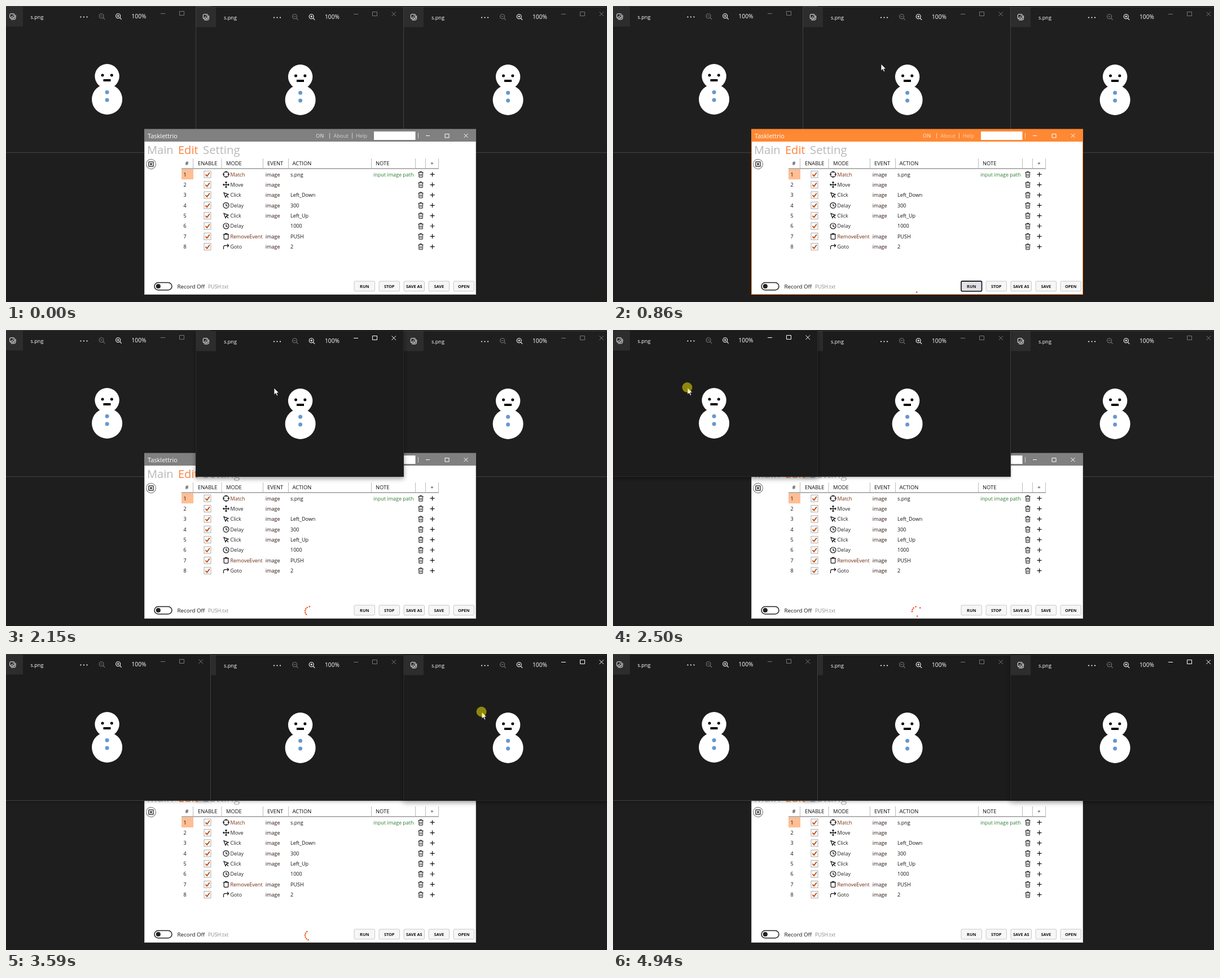
An HTML page for the animation above (5870 ms loop, 1065 by 526 pixels).

```html
<!DOCTYPE html>
<html lang="en">
<head>
<meta charset="utf-8">
<title>Macro editor</title>
<style>
html, body { margin: 0; width: 100%; height: 100%; overflow: hidden; background: #1e1e1e; }
svg { display: block; font-family: "Open Sans", "Noto Sans", sans-serif; }
text { white-space: pre; }
.line { fill: none; stroke: #111; stroke-width: 1.2; }
</style>
</head>
<body>
<svg id="stage" width="1065" height="526" viewBox="0 0 1065 526">
  <defs>
    <filter id="deep" x="-10%" y="-10%" width="120%" height="125%">
      <feDropShadow dx="0" dy="3" stdDeviation="4" flood-color="#000" flood-opacity=".4"/>
    </filter>
    <filter id="soft" x="-10%" y="-10%" width="120%" height="125%">
      <feDropShadow dx="0" dy="2" stdDeviation="2.5" flood-color="#000" flood-opacity=".22"/>
    </filter>
  </defs>
  <rect width="1065" height="526" fill="#1e1e1e"/>
  <rect width="1065" height="1" fill="#141414"/>
  <g id="desk"></g>
  <g id="pointer">
    <path id="arrow" d="M0 0V12.2L2.9 9.5L4.9 13.9L6.9 13L5 8.8H8.8Z" fill="#fff" stroke="#111" stroke-width=".8"/>
    <circle id="press" cx="-.5" cy="-.5" r="9" fill="#fff000" fill-opacity=".5"/>
  </g>
</svg>
<script>
const LOOP = 5870;
const $ = id => document.getElementById(id);
const desk = $('desk');

// Markup helpers
const text = (x, y, s, size, fill = '#111', extra = '') =>
  `<text x="${x}" y="${y}" font-size="${size}" fill="${fill}" ${extra}>${s}</text>`;
const rect = (x, y, w, h, fill, extra = '') =>
  `<rect x="${x}" y="${y}" width="${w}" height="${h}" fill="${fill}" ${extra}/>`;
const disc = (x, y, r, fill, extra = '') =>
  `<circle cx="${x}" cy="${y}" r="${r}" fill="${fill}" ${extra}/>`;
const path = (d, extra = 'class="line"') => `<path d="${d}" ${extra}/>`;
const at = (x, y, inner) => `<g transform="translate(${x} ${y})">${inner}</g>`;

function group(markup) {
  const g = document.createElementNS('http://www.w3.org/2000/svg', 'g');
  g.innerHTML = markup;
  desk.append(g);
  return g;
}

// Image viewer window
const snowman =
  disc(521.6, 125.8, 21.7, '#fff') + disc(521.6, 166.9, 27, '#fff') +
  disc(513.5, 124, 2.5, '#000') + disc(529.8, 124, 2.5, '#000') +
  rect(515, 131, 13, 4, '#000') +
  disc(521.6, 154.3, 3.5, '#6699cc') + disc(521.6, 168, 3.5, '#6699cc');

function lens(x, color, sign) {
  const look = `fill="none" stroke="${color}" stroke-width="1.1"`;
  return disc(x, 18.7, 4, 'none', `stroke="${color}" stroke-width="1.1"`) +
    path(`M${x + 3} 21.7L${x + 6} 24.8${sign}`, look);
}

function viewer(dx, dy) {
  const icon = `fill="none" stroke="#fff" stroke-width="1"`;
  const edge = Math.ceil(dx);
  const g = group(
    at(edge, dy,
      rect(336.5, 1.5, 368, 259 - dy, '#1f1f1f', 'class="frame"') +
      rect(337, 2, 35, 35.5, '#2d2d2d') +
      path('M616 14.5H624M649.5 10.5H657.5V17.5H649.5ZM683.5 10.5L691 18M691 10.5L683.5 18', 'class="ctl" fill="none" stroke-width="1"')) +
    at(dx, dy,
      rect(349.3, 14.8, 8.2, 8, 'none', 'rx="1.5" stroke="#fff"') +
      path('M350.3 22.4L353.4 19L356.6 22.4M351.3 24.9H357Q359.5 24.9 359.5 22.4V17', icon) +
      disc(355.2, 17.2, .8, '#fff') +
      text(386, 23.5, 's.png', 9.1, '#fff') +
      [475, 480.5, 486].map(x => disc(x, 20.5, 1.1, '#fff')).join('') +
      lens(511.6, '#777', 'M509.6 18.7H513.6') +
      lens(541.2, '#fff', 'M539.2 18.7H543.2M541.2 16.7V20.7') +
      text(565, 23.2, '100%', 10.2, '#fff') +
      snowman));
  const frame = g.querySelector('.frame'), ctl = g.querySelector('.ctl');
  g.look = (active, raised) => {
    frame.setAttribute('stroke', active ? '#292929' : '#414141');
    ctl.setAttribute('stroke', active ? '#fff' : '#777');
    frame.setAttribute('filter', active ? 'url(#deep)' : raised ? 'url(#soft)' : 'none');
  };
  return g;
}

// Script editor window
const modeIcons = {
  Match: path('M-4.8 0A4.8 4.8 0 1 1 4.8 0A4.8 4.8 0 1 1 -4.8 0M0 -6V-2.5M0 6V2.5M-6 0H-2.5M6 0H2.5'),
  Move: path('M0 -5V5M-5 0H5M-1.7 -3.5L0 -5.2L1.7 -3.5M-1.7 3.5L0 5.2L1.7 3.5M-3.5 -1.7L-5.2 0L-3.5 1.7M3.5 -1.7L5.2 0L3.5 1.7'),
  Click: path('M-4 -4L4 -1L.6 .6L-1 4ZM.6 .6L4 4.5'),
  Delay: path('M-5 0A5 5 0 1 1 5 0A5 5 0 1 1 -5 0M0 -3V.4L2.6 1.4'),
  RemoveEvent: path('M-5 -3.5H5M-1.8 -3.5V-5H1.8V-3.5M-3.8 -3.5V4Q-3.8 5 -2.8 5H2.8Q3.8 5 3.8 4V-3.5'),
  Goto: path('M-4.5 4.5V1Q-4.5 -2 -1.5 -2H4.5M2 -4.7L4.7 -2L2 .7')
};
const modeColors = { Match: '#7a3414', RemoveEvent: '#6e2a10' };
const bin = path('M-4.5 -3.5H4.5M-1.6 -3.5V-5H1.6V-3.5M-3.5 -3.5L-3.1 5H3.1L3.5 -3.5M-1.2 -1V3M1.2 -1V3', 'class="line" style="stroke-width:1"');

const rows = [
  ['Match', 'image', 's.png'], ['Move', 'image', ''], ['Click', 'image', 'Left_Down'],
  ['Delay', 'image', '300'], ['Click', 'image', 'Left_Up'], ['Delay', '', '1000'],
  ['RemoveEvent', 'image', 'PUSH'], ['Goto', 'image', '2']
];

function scriptRow([mode, event, action], i) {
  return at(0, 299.2 + 18.36 * i,
    (i ? '' : rect(311, -9.2, 21, 18.2, '#ffbe93')) +
    text(317, 3.3, i + 1, 9, '#111', 'text-anchor="middle"') +
    rect(351, -6, 12, 12, '#fff', 'stroke="#aaa"') +
    path('M353.5 .2L356.2 3L360.8 -3.2', 'fill="none" stroke="#c04f12" stroke-width="1.9"') +
    at(390, 0, modeIcons[mode]) +
    text(397.5, 3.3, mode, 9, modeColors[mode] || '#222') +
    text(459.8, 3.3, event, 9, '#2a1410') +
    text(504, 3.3, action, 9) +
    at(735, 0, bin) + path('M751.5 0H759.5M755.5 -4V4'));
}

const headings = [[317.5, '#'], [340, 'ENABLE'], [390, 'MODE'], [463, 'EVENT'], [507.5, 'ACTION'], [655, 'NOTE'], [752.3, '+']];
const buttons = ['RUN', 'STOP', 'SAVE AS', 'SAVE', 'OPEN'];

function editor() {
  const g = group(
    rect(245.5, 219.5, 587, 293, '#fff', 'class="border"') +
    rect(245, 218.5, 588, 22.5, '#808080', 'class="bar"') +
    text(251, 234.6, 'Tasklettrio', 11, '#fff') +
    `<g class="menu">` + text(549, 234, 'ON', 9.3, 'inherit', 'font-weight="600"') +
    text(580.5, 234, 'About', 9.3, 'inherit') + text(620, 234, 'Help', 9.3, 'inherit') +
    [573, 613, 730].map(x => rect(x, 225.5, 1, 10, 'inherit')).join('') + `</g>` +
    rect(652, 223, 73.5, 15, '#fff') +
    path('M744 230.5H751M778 227.5H785V234H778ZM811.5 227L818.5 234M818.5 227L811.5 234', 'fill="none" stroke="#fff"') +
    text(250, 263, 'Main', 20, '#b8b8b8') +
    text(305, 263, 'Edit', 20, '#fb8440') +
    text(349, 263, 'Setting', 20.3, '#b8b8b8') +
    disc(257, 281, 8.6, '#f7f7f7', 'stroke="#888" stroke-width="1.2"') +
    rect(252.8, 276.8, 8.4, 8.4, 'none', 'rx="1" stroke="#222" stroke-width="1.2"') +
    path('M255.2 279.2L258.8 282.8M258.8 279.2L255.2 282.8') +
    headings.map(([x, s]) => text(x, 283.3, s, 9.4)).join('') +
    [331, 381.5, 455, 500, 647, 725, 743, 766].map(x => rect(x, 271, 1, 18, '#bbb')).join('') +
    rect(311, 288, 456, 1.8, '#aaa') +
    rows.map(scriptRow).join('') +
    text(651, 302.5, 'input image path', 9, '#2e7d32') +
    rect(263, 491.5, 31, 13.2, '#fff', 'rx="6.6" stroke="#222" stroke-width="1.5"') +
    disc(269.8, 498, 4.1, '#222') +
    text(303.5, 502, 'Record Off', 9.8) + text(358, 502, 'PUSH.txt', 8.8, '#888') +
    buttons.map((s, i) => rect(617 + 44 * i, 489, 36.5, 17.8, '#f6f6f6', `class="btn" rx="2" stroke="#c8c8c8"`) +
      text(635.2 + 44 * i, 501.4, s, 7.3, '#111', 'font-weight="700" text-anchor="middle"')).join('') +
    disc(0, 0, 1.3, '#e4511b', 'class="dot"').repeat(6));
  const bar = g.querySelector('.bar'), border = g.querySelector('.border');
  const menu = g.querySelector('.menu'), run = g.querySelector('.btn');
  g.look = active => {
    bar.setAttribute('fill', active ? '#ff8833' : '#808080');
    border.setAttribute('stroke', active ? '#ff8833' : '#c8c8c8');
    menu.setAttribute('fill', active ? '#ffd3b0' : '#d0d0d0');
    run.setAttribute('fill', active ? '#e0e0e6' : '#f6f6f6');
    run.setAttribute('stroke', active ? '#222' : '#c8c8c8');
    run.setAttribute('stroke-width', active ? 1.8 : 1);
  };
  g.dots = [...g.querySelectorAll('.dot')];
  return g;
}

const left = viewer(-342.5, -1), mid = viewer(0, 0), right = viewer(368, 0), edit = editor();

// Stacking from back to front, and the active window
const stages = [
  { from: 0, stack: [left, mid, right, edit], active: null },
  { from: 565, stack: [left, mid, right, edit], active: edit },
  { from: 930, stack: [left, right, edit, mid], active: mid },
  { from: 2255, stack: [right, edit, mid, left], active: left },
  { from: 3580, stack: [edit, mid, left, right], active: right }
];
let shown = null;

function stackWindows(t) {
  const stage = stages.findLast(s => t >= s.from);
  if (stage === shown) return;
  shown = stage;
  const { stack, active } = stage;
  stack.forEach((w, i) => {
    desk.append(w);
    w.look(w === active, i > stack.indexOf(edit));
  });
}

// Progress ring: [ms, degrees, spline of the segment that ends here]
const ringKeys = [
  [0, -110], [433, 10, [.02, .33, .38, .77]], [1200, 93], [1617, 205, [.57, .17, .95, .75]],
  [2017, 357, [0, .19, .07, .72]], [2783, 439], [3217, 585, [0, 0, .95, .37]]
];
const RING_START = 775, RING_GAP = 167, RING_TURN = 148;

const cubic = (a, b, s) => 3 * (1 - s) * (1 - s) * s * a + 3 * (1 - s) * s * s * b + s ** 3;
function spline([x1, y1, x2, y2], x) {
  let lo = 0, hi = 1;
  for (let i = 0; i < 24; i++) {
    const s = (lo + hi) / 2;
    if (cubic(x1, x2, s) < x) lo = s; else hi = s;
  }
  return cubic(y1, y2, lo);
}

function ringAngle(t) {
  const i = ringKeys.findIndex(k => k[0] > t);
  const [t0, a0] = ringKeys[i - 1], [t1, a1, curve] = ringKeys[i];
  const u = (t - t0) / (t1 - t0);
  return a0 + (a1 - a0) * (curve ? spline(curve, u) : u);
}

function drawRing(t) {
  edit.dots.forEach((dot, i) => {
    const local = t - RING_START - i * RING_GAP;
    const on = local >= 0 && local < 3217;
    dot.style.display = on ? '' : 'none';
    if (!on) return;
    const a = (ringAngle(local) - 6 * i + RING_TURN) * Math.PI / 180;
    dot.setAttribute('cx', 538.5 + 8.5 * Math.cos(a));
    dot.setAttribute('cy', 500 + 8.5 * Math.sin(a));
  });
}

// Pointer: glides in to the button, then jumps between the pictures
const presses = [[500, 785], [930, 1260], [2255, 2570], [3580, 3890]];

function pointerAt(t) {
  if (t < 200 || t >= 4240) return null;
  if (t < 850) {
    const u = 1 - (1 - Math.min(1, (t - 200) / 280)) ** 2;
    return [652 - 14 * u, 520 - 20 * u];
  }
  if (t < 2220) return [475, 103];
  if (t < 3520) return [132, 102.5];
  if (t < 4090) return [843, 103];
  const u = (t - 4090) / 150;
  return [843 + 128 * u * u, 103 + 160 * u * u];
}

function drawPointer(t) {
  const p = pointerAt(t);
  $('pointer').style.display = p ? '' : 'none';
  if (!p) return;
  $('pointer').setAttribute('transform', `translate(${p[0]} ${p[1]})`);
  $('press').style.display = presses.some(([a, b]) => t >= a && t < b) ? '' : 'none';
}

function draw(t) {
  stackWindows(t);
  drawRing(t);
  drawPointer(t);
}

const start = performance.now();
function tick(now) {
  draw(Math.max(0, now - start) % LOOP);
  requestAnimationFrame(tick);
}
draw(0);
requestAnimationFrame(tick);
</script>
</body>
</html>
```
